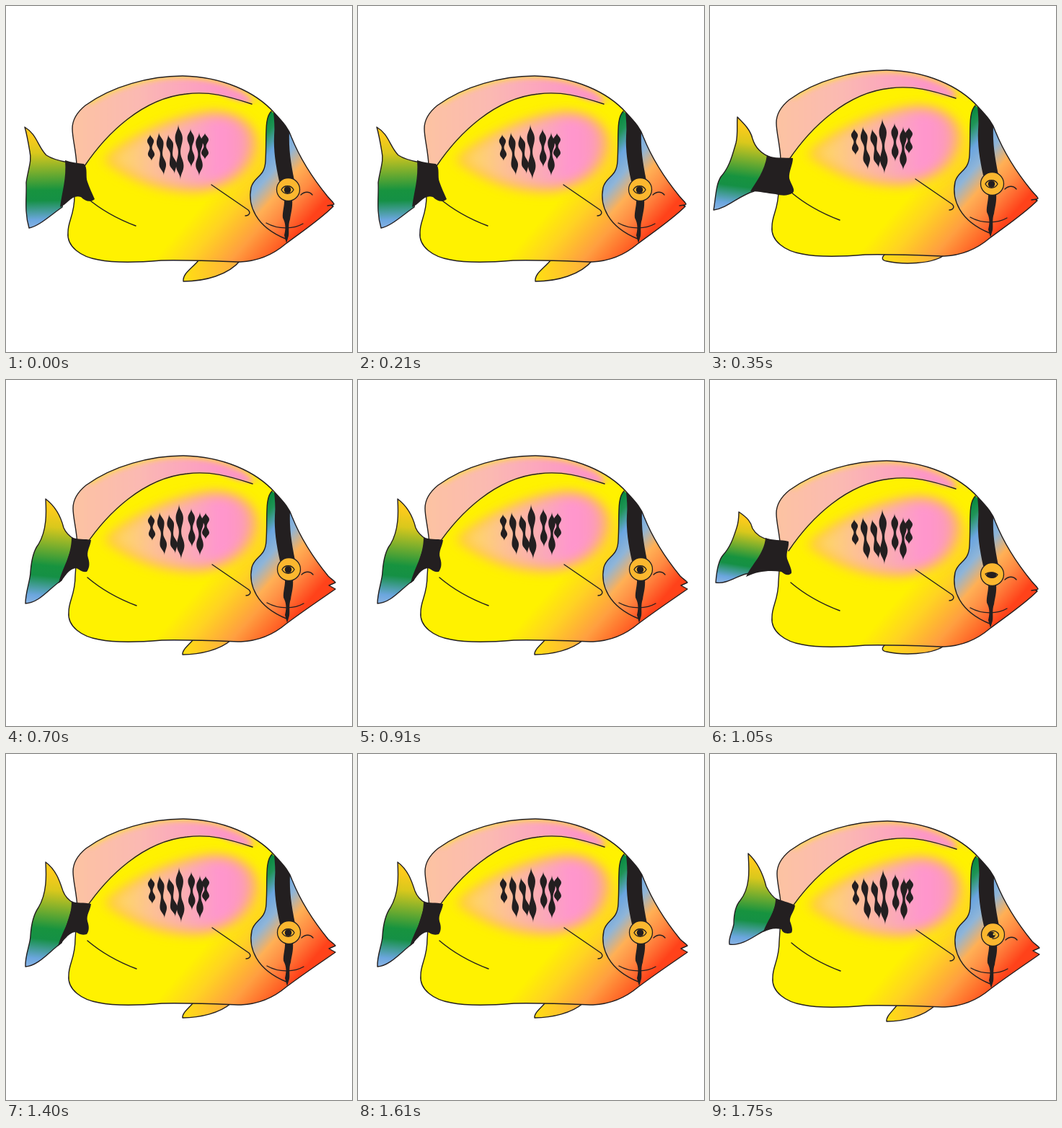
Write an HTML page that moves like this. It is 480 px wide and 480 px high and loops after 2100 ms.

```html
<!DOCTYPE html>
<html lang="en">
<head>
<meta charset="utf-8">
<title>Swimming fish</title>
<style>
html, body { margin: 0; width: 100%; height: 100%; overflow: hidden; background: #fff; }
svg { display: block; width: 100%; height: 100%; }
.line { fill: none; stroke: #231f20; stroke-width: 1.4; stroke-linecap: round; stroke-linejoin: round; }
.ink { fill: #231f20; }
</style>
</head>
<body>
<svg viewBox="0 0 480 480">
  <defs>
    <linearGradient id="skin" gradientUnits="userSpaceOnUse" x1="290" y1="255" x2="388" y2="341">
      <stop offset="0" stop-color="#fff200"/>
      <stop offset=".28" stop-color="#ffd322"/>
      <stop offset=".62" stop-color="#ff9f40"/>
      <stop offset="1" stop-color="#ff4a1c"/>
    </linearGradient>
    <linearGradient id="face" gradientUnits="userSpaceOnUse" x1="358" y1="160" x2="461" y2="251">
      <stop offset="0" stop-color="#078a3e"/>
      <stop offset=".1" stop-color="#1f9456"/>
      <stop offset=".25" stop-color="#6aa5e0"/>
      <stop offset=".4" stop-color="#8fb5d8"/>
      <stop offset=".58" stop-color="#ffb055"/>
      <stop offset=".76" stop-color="#ff8a42"/>
      <stop offset="1" stop-color="#ff421a"/>
    </linearGradient>
    <linearGradient id="finTop" gradientUnits="userSpaceOnUse" x1="92" y1="0" x2="352" y2="0">
      <stop offset="0" stop-color="#fdc3a2"/>
      <stop offset=".35" stop-color="#fbb9b2"/>
      <stop offset=".8" stop-color="#fd97c6"/>
      <stop offset=".9" stop-color="#fd97b8"/>
      <stop offset="1" stop-color="#ffc850" stop-opacity="0"/>
    </linearGradient>
    <linearGradient id="patch" gradientUnits="userSpaceOnUse" x1="140" y1="0" x2="350" y2="0">
      <stop offset="0" stop-color="#ffdf50"/>
      <stop offset=".28" stop-color="#fdc293"/>
      <stop offset=".55" stop-color="#fba9b8"/>
      <stop offset=".75" stop-color="#ff94d0"/>
      <stop offset=".88" stop-color="#fd99be"/>
      <stop offset="1" stop-color="#fda88c"/>
    </linearGradient>
    <linearGradient id="finLow" x1="0" y1="0" x2="1" y2="0">
      <stop offset="0" stop-color="#ffdf12"/>
      <stop offset="1" stop-color="#ffab42"/>
    </linearGradient>
    <linearGradient id="tailFill" gradientUnits="userSpaceOnUse">
      <stop offset=".08" stop-color="#ffcb1c"/>
      <stop offset=".26" stop-color="#d9c81c"/>
      <stop offset=".63" stop-color="#17933f"/>
      <stop offset=".73" stop-color="#159045"/>
      <stop offset=".92" stop-color="#6ba6de"/>
      <stop offset="1" stop-color="#86b2e4"/>
    </linearGradient>
    <filter id="soft" x="-30%" y="-30%" width="160%" height="160%"><feGaussianBlur stdDeviation="8"/></filter>
    <filter id="haze" x="-30%" y="-60%" width="160%" height="220%"><feGaussianBlur stdDeviation="3.5"/></filter>
    <filter id="edge"><feGaussianBlur stdDeviation="1.2"/></filter>
    <clipPath id="inside"><path class="outline"/></clipPath>
  </defs>

  <path id="belly" class="line" style="fill:url(#finLow)"/>

  <g id="fish">
    <path class="outline" fill="url(#skin)"/>
    <g clip-path="url(#inside)">
      <path d="M94 222C88 200 84 183 84 168C86 150 98 140 110 132C150 104 200 90 245 90C290 92 325 108 356 134L341 136C308 125 282 118 250 122C190 128 140 176 109 222Z" fill="url(#finTop)" filter="url(#edge)"/>
      <ellipse cx="314" cy="121" rx="28" ry="7" transform="rotate(20 314 121)" fill="#fd97c6" filter="url(#haze)"/>
      <path d="M115 134C150 110 200 97 245 97C290 98 325 112 358 135" fill="none" stroke="#ffe22a" stroke-width="5" filter="url(#haze)"/>
      <path d="M134 214C166 182 225 155 270 148C312 140 352 160 352 193C349 229 312 256 268 258C220 260 174 245 134 214Z" fill="#ffc545" filter="url(#soft)"/>
      <path d="M147 212C176 185 225 162 272 153C311 145 342 163 341 192C338 225 305 250 264 252C216 252 177 237 147 212Z" fill="url(#patch)" filter="url(#soft)"/>
      <path d="M368 146C358 156 362 180 360 215C359 238 344 236 340 252C335 276 346 306 388 323L390 335L470 300L470 230Z" fill="url(#face)"/>
      <path class="ink" d="M371 147L385 158L393 174C392 198 395 217 400 242L379 243C374 220 371 200 372 180C373 168 372 158 371 147Z"/>
    </g>
    <path class="line" d="M368 146C358 156 362 180 360 215C359 238 344 236 340 252C335 276 346 306 388 323"/>
    <path class="line" d="M109 222C140 176 190 128 250 122C282 118 308 125 341 136"/>
    <path class="line" d="M112 266C132 283 156 296 180 305"/>
    <path class="line" d="M285 248L336 283C340 287 337 291 332 291"/>
    <path class="line" d="M361 301C379 311 400 309 412 302M409 262C414 257 421 257 425 262"/>
    <path class="ink" d="M386 266L397 268C398 280 395 288 394 296C391 304 393 312 392 319L389 329L386 318C389 306 387 300 384 294C383 286 387 276 386 266Z"/>
    <path id="spots" class="ink"/>
    <path class="outline line"/>
    <path id="lip" class="line"/>
    <circle cx="391.500" cy="254.500" r="16" fill="#fbb72f" stroke="#231f20" stroke-width="1.3"/>
    <path id="lid" class="line" style="stroke-width:1.300"/>
    <ellipse id="pupil" class="ink"/>
    <circle id="glint" r="1.500" fill="#fbd23c"/>
  </g>

  <path id="tail" class="line" style="fill:url(#tailFill)"/>
  <path id="band" class="ink"/>
</svg>
<script>
const STEP = 350;
const $ = id => document.getElementById(id);
const set = (el, attrs) => { for (const k in attrs) el.setAttribute(k, attrs[k]); };

const mouths = {
  shut: { edge: "C452 271 455 273 455 275L452 277L454 278", lip: "M446 277L453 276" },
  open: { edge: "C450 268 454 270 456 273L447 277L456 282", lip: "" }
};
const bodyPath = mouth =>
  "M98 220C97 200 92 183 92 170C92 157 99 147 110 138C147 111 200 97 245 97" +
  "C300 98 346 119 372 148C386 163 392 170 396 182C408 212 428 242 446 264" + mouth.edge +
  "C436 296 412 312 388 330C368 347 348 354 325 355C290 354 248 352 215 353" +
  "C180 356 148 356 128 352C104 348 84 334 86 314C86 298 95 290 95 264Z";

// Two beads on a thin neck, tapering to a point at both ends.
function beads([x0, y0, x1, y1, w]) {
  const radii = [0, w, 1.6, w, 0];
  const rim = side => radii.map((r, i) => [x0 + (x1 - x0) * i / 4 + side * r, y0 + (y1 - y0) * i / 4]);
  const curve = pts => pts.slice(1).map(([x, y], i) => {
    const [px, py] = pts[i], k = (y - py) * .42;
    return `C${px} ${py + k} ${x} ${y - k} ${x} ${y}`;
  }).join("");
  return `M${x0} ${y0}${curve(rim(1))}${curve(rim(-1).reverse())}Z`;
}
$("spots").setAttribute("d", [
  [200, 178, 202, 215, 4.6], [212, 175, 219, 235, 4.8], [225, 178, 234, 233, 4.8],
  [239, 164, 242, 241, 5.2], [256, 170, 257, 224, 4.8], [268, 175, 268, 236, 4.8],
  [276, 176, 276, 213, 5]
].map(beads).join(""));

const eyes = {
  ahead: { lid: "M382 255C385 248 396 248 399 255C395 262 386 262 382 255Z", at: [390.5, 255], r: [4.8, 4.8], glint: 0 },
  sleepy: { lid: "M382 254C387 251 395 251 399 255C396 261 386 261 382 254Z", at: [390.5, 255.5], r: [7, 4], glint: 0 },
  back: { lid: "M384 256C386 249 394 247 399 253C401 257 396 261 391 260", at: [390, 255], r: [4.8, 4.3], glint: 1 }
};
const flat = y => `M242 ${y}C238 ${y + 4} 238 ${y + 8} 245 ${y + 9}C268 ${y + 14} 306 ${y + 13} 323 ${y + 2}`;
const hung = (y, drop) => `M259 ${y}C252 ${y + drop * .4} 244 ${y + drop * .7} 245 ${y + drop}C270 ${y + drop} 297 ${y + drop * .65} 312 ${y}`;

// tips: upper and lower ends of the tail; they also steer its gradient.
const poses = [
  { x: 0, y: 0, mouth: "shut", eye: "ahead", tips: [26, 168, 32, 308],
    belly: "M267 353C257 365 245 371 246 382C276 382 309 373 325 353",
    right: "C43 178 44 195 56 207C65 213 75 215 86 217L78 279C62 290 45 306 32 308",
    left: "C25 285 29 263 28 245C31 225 36 215 33 202C31 190 29 178 26 168",
    band: "M82 214C91 217 99 218 108 219C114 224 110 237 113 244C116 253 120 261 123 268C117 273 110 271 104 265C91 261 86 275 75 279C78 256 84 240 82 214Z" },
  { x: 0, y: -8, mouth: "shut", eye: "ahead", tips: [38, 154, 5, 283],
    belly: flat(345),
    right: "C48 164 56 172 59 184C63 198 74 206 84 210L61 257C40 263 25 280 5 283",
    left: "C8 266 8 248 15 237C27 224 31 207 36 190C39 178 37 165 38 154",
    band: "M79 207C88 212 104 210 115 211C115 220 109 230 110 239C112 247 119 255 115 259C108 264 99 263 91 261C79 260 70 257 56 257C64 244 76 229 79 207Z" },
  { x: 1, y: 8, mouth: "open", eye: "ahead", tips: [55, 165, 27, 310],
    belly: hung(361, 20),
    right: "C71 177 77 193 80 205C83 212 88 217 95 221L77 278C61 288 47 309 27 310",
    left: "C27 294 34 277 34 266C35 253 37 238 45 228C57 208 56 183 55 165",
    band: "M91 218C99 222 110 220 118 222C117 231 111 238 114 247C117 256 115 262 112 266C104 267 102 262 97 261C84 263 81 277 73 282C78 260 91 245 91 218Z" },
  { x: 0, y: 15, mouth: "shut", eye: "sleepy", tips: [40, 183, 8, 281],
    belly: flat(368),
    right: "C52 191 57 197 59 206C64 215 74 220 83 222L56 268C42 268 25 284 8 281",
    left: "C9 267 11 251 18 243C29 231 33 217 37 205C40 196 40 190 40 183",
    band: "M77 219C87 223 98 221 109 224C110 232 105 239 107 248C110 256 114 264 113 268C108 273 103 269 99 266C82 264 67 265 50 273C58 255 75 242 77 219Z" },
  { x: 1, y: -7, mouth: "open", eye: "ahead", tips: [55, 150, 27, 295],
    belly: hung(346, 20),
    right: "C70 161 75 178 79 190C82 198 87 203 94 207L77 262C61 273 45 294 27 295",
    left: "C26 280 34 263 34 252C35 237 38 223 45 213C57 193 56 168 55 150",
    band: "M91 204C98 208 108 205 118 208C117 217 111 223 113 232C116 240 115 246 112 250C104 252 101 249 97 247C87 247 80 260 72 267C78 245 91 231 91 204Z" },
  { x: 1, y: -4, mouth: "open", eye: "back", tips: [53, 138, 27, 264],
    belly: hung(349, 22),
    right: "C68 152 74 168 78 184C83 194 88 199 94 203L79 243C63 251 45 267 27 264",
    left: "C25 256 31 247 33 236C33 224 35 211 42 203C57 184 54 157 53 138",
    band: "M91 200C99 204 109 205 118 210C117 219 110 225 111 232C114 240 115 245 113 248C107 250 101 249 99 243C89 241 83 243 74 247C79 231 91 220 91 200Z" }
];

function draw(p) {
  const [tx, ty, bx, by] = p.tips, mouth = mouths[p.mouth], eye = eyes[p.eye];
  set($("fish"), { transform: `translate(${p.x} ${p.y})` });
  document.querySelectorAll(".outline").forEach(el => set(el, { d: bodyPath(mouth) }));
  set($("lip"), { d: mouth.lip });
  set($("lid"), { d: eye.lid });
  set($("pupil"), { cx: eye.at[0], cy: eye.at[1], rx: eye.r[0], ry: eye.r[1] });
  set($("glint"), { cx: eye.at[0] + 3, cy: eye.at[1] - 1, opacity: eye.glint });
  set($("belly"), { d: p.belly });
  set($("tailFill"), { x1: tx, y1: ty, x2: (tx + bx) / 2, y2: by });
  set($("tail"), { d: `M${tx} ${ty}${p.right}${p.left}Z` });
  set($("band"), { d: p.band });
}

let shown = -1;
function tick(now) {
  const i = Math.floor(now / STEP) % poses.length;
  if (i !== shown) draw(poses[shown = i]);
  requestAnimationFrame(tick);
}
draw(poses[0]);
requestAnimationFrame(tick);
</script>
</body>
</html>
```
